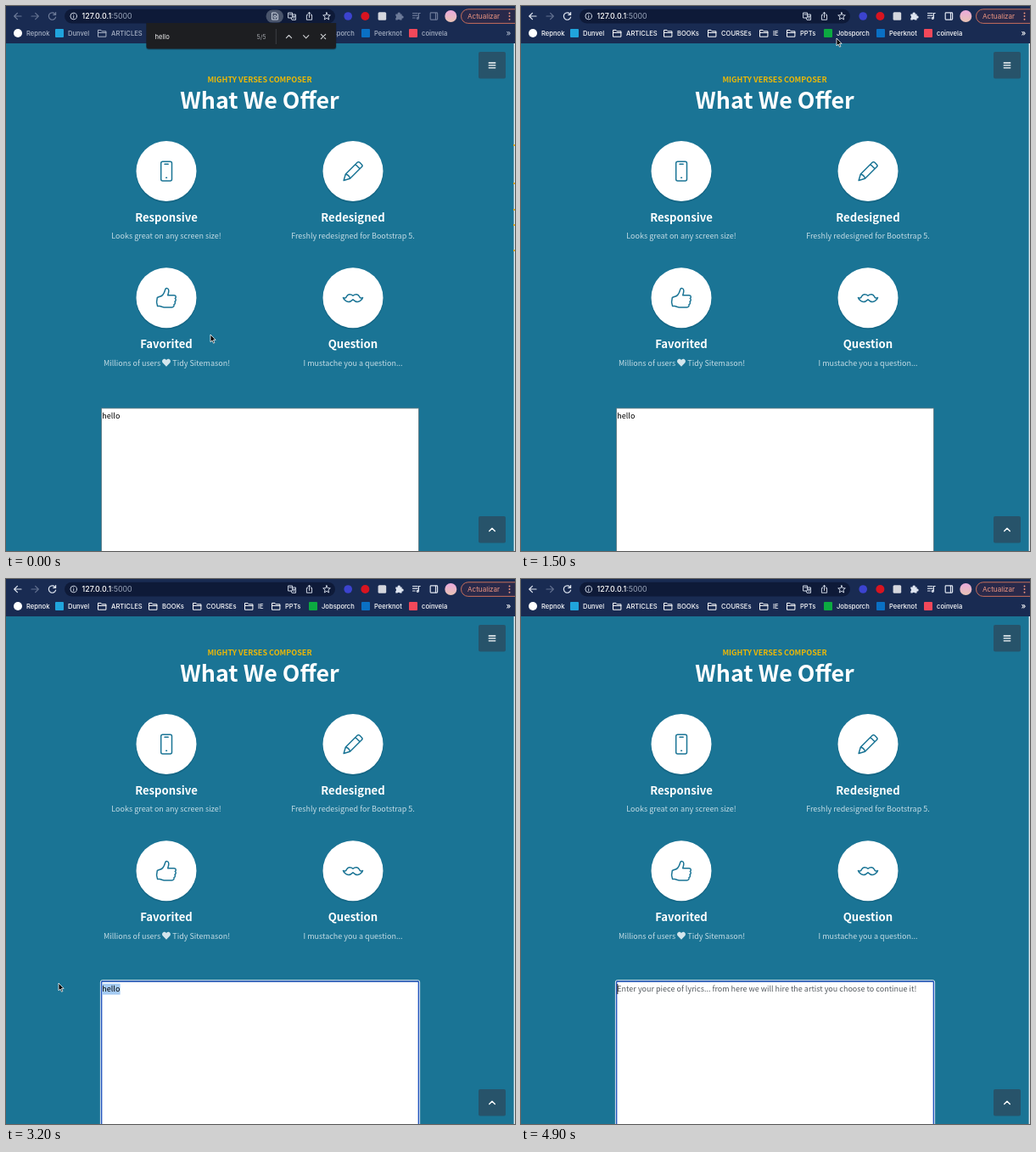
These frames come from a looping animation (600x642 px, 5000 ms). An HTML page:

```html
<!DOCTYPE html>
<html lang="en">
<head>
<meta charset="utf-8">
<title>What We Offer</title>
<style>
html, body { margin: 0; width: 100%; height: 100%; overflow: hidden; background: #1a7495; }
svg { display: block; }
#stage { width: 600px; height: 642px; --fg: #fff; --icon: #dfe5f0; }
#stage.idle { --fg: #a9b3c6; --icon: #6d7b99; }
.page text { font-family: "Noto Sans CJK JP", "Noto Sans CJK SC", "Noto Sans CJK", "Noto Sans", sans-serif; font-size: 9.03px; }
.ui text { font-family: Inter, Roboto, sans-serif; font-size: 7.6px; }
.mid { text-anchor: middle; }
.page .title { font-size: 26.8px; font-weight: 700; fill: #fff; }
.page .kicker { font-weight: 700; fill: #ecb807; }
.page .head { font-size: 13.15px; font-weight: 700; fill: #fff; }
.page .note { fill: #c4dce5; }
.marks text { fill: var(--fg); font-weight: 500; }
.line { fill: none; stroke-linecap: round; stroke-linejoin: round; }
.ink { stroke: #1a7495; stroke-width: 1.5; }
.tool { stroke: var(--icon); stroke-width: 1.2; }
.lit { stroke: #cdd5e3; stroke-width: 1; }
</style>
</head>
<body>
<svg id="stage" viewBox="0 0 600 642">
  <defs>
    <linearGradient id="face" x2="0" y2="1">
      <stop offset="0" stop-color="#e9a9dc"/><stop offset="1" stop-color="#e8c3b4"/>
    </linearGradient>
    <g id="folder"><path class="line" stroke="var(--fg)" d="M-4.7 3.8V-3.6H-1.2L0-2.2H4.7V3.8ZM-4.7-.6H4.7"/></g>
  </defs>

  <g class="page">
    <rect y="44" width="600" height="598" fill="#1a7495"/>
    <rect x="598.6" y="44" width="1.4" height="598" fill="#e3ebef"/>
    <g id="ticks" fill="#d9a520"></g>
    <text class="kicker mid" x="299" y="90">MIGHTY VERSES COMPOSER</text>
    <text class="title mid" x="299" y="121">What We Offer</text>

    <g id="cards"></g>
    <g class="line ink">
      <rect x="182.7" y="183.3" width="12.8" height="22.6" rx="2"/>
      <path d="M187 186.2H191.2M188.7 202.3H189.5"/>
      <path transform="translate(408.6 195) rotate(45)" d="M-3.7 8V-11.5A2 2 0 0 1-1.7-13.5H1.7A2 2 0 0 1 3.7-11.5V8L0 14.8ZM-3.7-8.3H3.7M-3.7 8Q0 5.8 3.7 8"/>
      <path d="M178.3 343.5C180 342.3 183.5 342.5 185 340C187 337.5 187.3 334.8 188 333.3C188.8 331.9 191.5 332.3 191.8 335C192 337.5 191 339.5 190.7 340.7H198C200.5 340.7 201 343.5 199.3 344.4C200.8 345.3 200.3 347.6 199 348.2C200 349.5 199.2 351.4 198 351.8C198.5 353.2 197.5 355 195.5 355H186.5C184.5 355 183 353.8 181 353.6H178.6C177.5 350.5 177.4 346.5 178.3 343.5Z"/>
      <path d="M409 341.3C406 338.5 402.5 339.8 401.5 342.3C400.8 344.2 399 344.5 397.5 343.5C398.3 347 403 349.6 406 348C407.5 347.2 408.3 346.5 409 345.8C409.7 346.5 410.5 347.2 412 348C415 349.6 419.7 347 420.5 343.5C419 344.5 417.2 344.2 416.5 342.3C415.5 339.8 412 338.5 409 341.3Z"/>
    </g>
    <text class="note" x="182.3" y="423.8" text-anchor="end">Millions of users</text>
    <path fill="#d3e5ec" d="M189 424.8L184.9 420.6C182.3 417.5 186.4 413.7 189 417C191.6 413.7 195.7 417.5 193.1 420.6Z"/>
    <text class="note" x="196.3" y="423.8">Tidy Sitemason!</text>

    <rect x="112.5" y="473.9" width="374" height="180" fill="#fff" stroke="#58727c" stroke-width=".8"/>
    <g id="ring" fill="none">
      <rect x="111.4" y="472.8" width="376.2" height="182" rx="2" stroke="#fff"/>
      <rect x="112.6" y="474" width="373.8" height="180" rx="1" stroke="#2355bd" stroke-width="1.5"/>
    </g>
    <rect id="sel" y="476.6" height="13" fill="#a5cbf3"/>
    <text id="typed" x="113.3" y="486.4">hello</text>
    <text id="hint" x="113.3" y="486.4" fill="#555b60">Enter your piece of lyrics... from here we will hire the artist you choose to continue it!</text>
    <rect id="caret" y="477" width=".9" height="12" fill="#000"/>

    <rect x="557" y="54" width="32" height="31.5" rx="2" fill="#27536a"/>
    <path class="line" stroke="#fff" stroke-width="1.3" d="M569.2 67H576.8M569.2 69.9H576.8M569.2 72.8H576.8"/>
    <rect x="557" y="601" width="32" height="31.5" rx="2" fill="#27536a"/>
    <path class="line" stroke="#fff" stroke-width="1.4" d="M569.7 618.5L573 615.2L576.3 618.5"/>
  </g>

  <g class="ui">
    <rect width="600" height="44" fill="#192b52"/>
    <g class="line">
      <path class="tool" d="M18 12H9.8M13.4 8.3L9.7 12L13.4 15.7"/>
      <path stroke="#62708f" stroke-width="1.2" d="M30 12H38.2M34.6 8.3L38.3 12L34.6 15.7"/>
      <path class="tool" d="M58 9.6A4.2 4.2 0 1 0 58.6 13.2M58.6 7.6V10.4H55.8"/>
    </g>
    <rect x="69" y="3.8" width="319" height="16.6" rx="8.3" fill="#0e1a38"/>
    <g class="line lit">
      <circle cx="79.7" cy="12" r="3.8"/>
      <path d="M79.7 11.8V14M79.7 10V10.1"/>
      <path d="M333 8H337.5V14H333ZM337.5 10H341.5V16.3H337L336 14M334 10H336.5M338.5 12.2H340.5M339.5 12.2V14.5"/>
      <path d="M355.6 10.6H354.4V16.2H360.6V10.6H359.4M357.5 13.5V7.4M355.7 9.1L357.5 7.3L359.3 9.1"/>
      <path d="M378 7.7L379.2 10.7L382.3 10.9L379.9 12.9L380.7 16L378 14.3L375.3 16L376.1 12.9L373.7 10.9L376.8 10.7Z"/>
    </g>
    <text x="89.5" y="15.2" fill="#fff" font-weight="500" style="font-size:8.9px">127.0.0.1<tspan fill="#9ba6bb" font-weight="400">:5000</tspan></text>

    <circle cx="403.2" cy="12" r="4.8" fill="#3c43cf"/>
    <circle cx="423.4" cy="12" r="5" fill="#d81420"/>
    <rect x="438.6" y="7.2" width="9.6" height="9.6" rx="1.5" fill="#d5d7de"/>
    <path fill="var(--icon)" d="M459.3 9.5H461.8A1.5 1.5 0 1 1 464.6 9.5H466.6V11.6A1.5 1.5 0 1 1 466.6 14.4V16.6H464.3A1.5 1.5 0 0 0 461.5 16.6H459.3V14.2A1.5 1.5 0 0 0 459.3 11.6Z"/>
    <g class="line tool">
      <path d="M479.5 8.5H485M479.5 11.2H485M479.5 14H482.3M486.4 14.2V8.5H488.2"/>
      <circle cx="485.3" cy="14.3" r="1"/>
      <rect x="500.2" y="7.9" width="8.4" height="8.2" rx=".8"/>
      <path d="M506.5 8.3V15.8"/>
    </g>
    <circle cx="524.3" cy="12" r="7" fill="url(#face)"/>
    <rect x="536.5" y="3.8" width="72" height="16.6" rx="8.3" fill="#29294a" stroke="#c66e5c"/>
    <text x="544" y="15" fill="#ee9580" style="font-size:8.1px">Actualizar</text>
    <path class="line" stroke="#ee9580" stroke-width="1.9" d="M593.5 8.4V8.5M593.5 12V12.1M593.5 15.6V15.7"/>

    <g class="marks" id="marks"></g>

    <g id="find">
      <rect x="306.5" y="4.6" width="20.5" height="15" rx="7.5" fill="#4a556c"/>
      <path class="line lit" d="M314 8H318.4L320.4 10V16H314Z"/>
      <circle class="line lit" cx="317.2" cy="12.6" r="1.5"/>
      <path d="M165 20H389.5V48.5A3 3 0 0 1 386.5 51.5H168A3 3 0 0 1 165 48.5Z" fill="#0c1a2c" opacity=".35"/>
      <path d="M165.5 20H389V47.5A3 3 0 0 1 386 50.5H168.5A3 3 0 0 1 165.5 47.5Z" fill="#1d1e21"/>
      <text x="175.6" y="38.6" fill="#f1f1f1">hello</text>
      <text x="295.5" y="38.6" fill="#a0a3a8" style="font-size:7.2px">5/5</text>
      <path d="M318.3 27V45" stroke="#46484c" stroke-width=".8"/>
      <path class="line" stroke="#cfd1d4" stroke-width="1.1" d="M330.4 37.6L333.5 34.5L336.6 37.6M350.6 34.7L353.7 37.8L356.8 34.7M371.3 33.3L376.7 38.7M376.7 33.3L371.3 38.7"/>
    </g>
  </g>

  <path id="arrow" fill="#000" stroke="#fff" stroke-width=".8" d="M0 0V8.8L2 7L3.5 10.2L4.9 9.6L3.4 6.4H6.1Z"/>
  <g id="beam" class="line">
    <path id="bar" stroke="#fff" stroke-width="2" stroke-opacity=".6" d="M-1.8-4.8Q0-4.8 0-3.6V3.6Q0 4.8-1.8 4.8M1.8-4.8Q0-4.8 0-3.6M0 3.6Q0 4.8 1.8 4.8M-1 1.7H1"/>
    <path stroke="#000" stroke-width=".9" d="M-1.8-4.8Q0-4.8 0-3.6V3.6Q0 4.8-1.8 4.8M1.8-4.8Q0-4.8 0-3.6M0 3.6Q0 4.8 1.8 4.8M-1 1.7H1"/>
  </g>
</svg>
<script>
const $ = id => document.getElementById(id);
const LOOP = 5000, STEP = 100;

const cards = [
  [189, 194.5, 'Responsive', 'Looks great on any screen size!'],
  [409, 194.5, 'Redesigned', 'Freshly redesigned for Bootstrap 5.'],
  [189, 343.7, 'Favorited', ''],
  [409, 343.7, 'Question', 'I mustache you a question...']
];
$('cards').innerHTML = cards.map(([x, y, head, note]) =>
  `<circle cx="${x}" cy="${y + 1.6}" r="35.8" fill="#0b4a63" opacity=".3"/>
   <circle cx="${x}" cy="${y}" r="35.5" fill="#fff"/>
   <text class="head mid" x="${x}" y="${y + 59.4}">${head}</text>
   <text class="note mid" x="${x}" y="${y + 79.9}">${note}</text>`).join('');

// Bookmark: text x, label, colour of its plain mark (none = folder)
const marks = [
  [24, 'Repnok', '#fff', 5], [73, 'Dunvel', '#20a4dc'], [124, 'ARTICLES'], [184, 'BOOKs'],
  [236, 'COURSEs'], [297, 'IE'], [329, 'PPTs'], [372, 'Jobsporch', '#0caa41'],
  [434, 'Peerknot', '#0a70c4'], [490, 'coinvela', '#f2485a']
];
$('marks').innerHTML = marks.map(([x, label, color, r = 1]) =>
  (color
    ? `<rect x="${x - 15}" y="27" width="10" height="10" rx="${r}" fill="${color}"/>`
    : `<use href="#folder" x="${x - 10.8}" y="32"/>`) +
  `<text x="${x}" y="34.8">${label}</text>`).join('') +
  '<text x="589.5" y="35" style="font-size:9.5px">»</text>';

$('ticks').innerHTML = [164, 209, 240, 258, 288]
  .map(y => `<rect x="598" y="${y - 1}" width="2" height="2"/>`).join('');

// Pointer stops: time, x, y
const path = [
  [0, 241, 387], [200, 241, 387], [1100, 372, 38], [1500, 372, 38],
  [1900, 155, 484], [2300, 155, 485.5], [2800, 155, 485.5], [3100, 62, 476], [LOOP, 62, 476]
];
const CLOSE = 1400, FOCUS = 2400, DRAG = 2800, ERASE = 3600;
const edges = [113.3, 118.8, 123.8, 126.4, 128.9, 134.6];
const END = edges[5];

const ease = p => p * p * (3 - 2 * p);
const show = (id, on) => $(id).setAttribute('visibility', on ? 'visible' : 'hidden');

function pointer(t) {
  const i = path.findIndex(p => p[0] > t);
  const [t0, x0, y0] = path[i - 1], [t1, x1, y1] = path[i];
  const k = ease((t - t0) / (t1 - t0));
  return [x0 + (x1 - x0) * k, y0 + (y1 - y0) * k];
}

function draw(t) {
  const finding = t < CLOSE, erased = t >= ERASE;
  $('stage').classList.toggle('idle', finding);
  show('find', finding);
  show('ticks', finding);
  show('ring', t >= FOCUS);
  show('typed', !erased);
  show('hint', erased);

  const [x, y] = pointer(t);
  const inBox = x > 112 && x < 487 && y > 474;
  for (const [id, on] of [['arrow', !inBox], ['beam', inBox]]) {
    show(id, on && !erased);
    $(id).setAttribute('transform', `translate(${x} ${y})`);
  }

  let from = END;
  if (t >= DRAG && !erased) {
    from = edges.reduce((a, b) => Math.abs(b - x) < Math.abs(a - x) ? b : a);
  }
  $('sel').setAttribute('x', from);
  $('sel').setAttribute('width', END - from);

  const since = t - (erased ? ERASE : FOCUS);
  show('caret', since >= 0 && since % 1000 < 500 && from === END);
  $('caret').setAttribute('x', erased ? 113.4 : END + .4);
}

const start = performance.now();
function tick() {
  const t = (performance.now() - start) % LOOP;
  draw(Math.floor(t / STEP) * STEP);
  requestAnimationFrame(tick);
}
draw(0);
requestAnimationFrame(tick);
</script>
</body>
</html>
```
